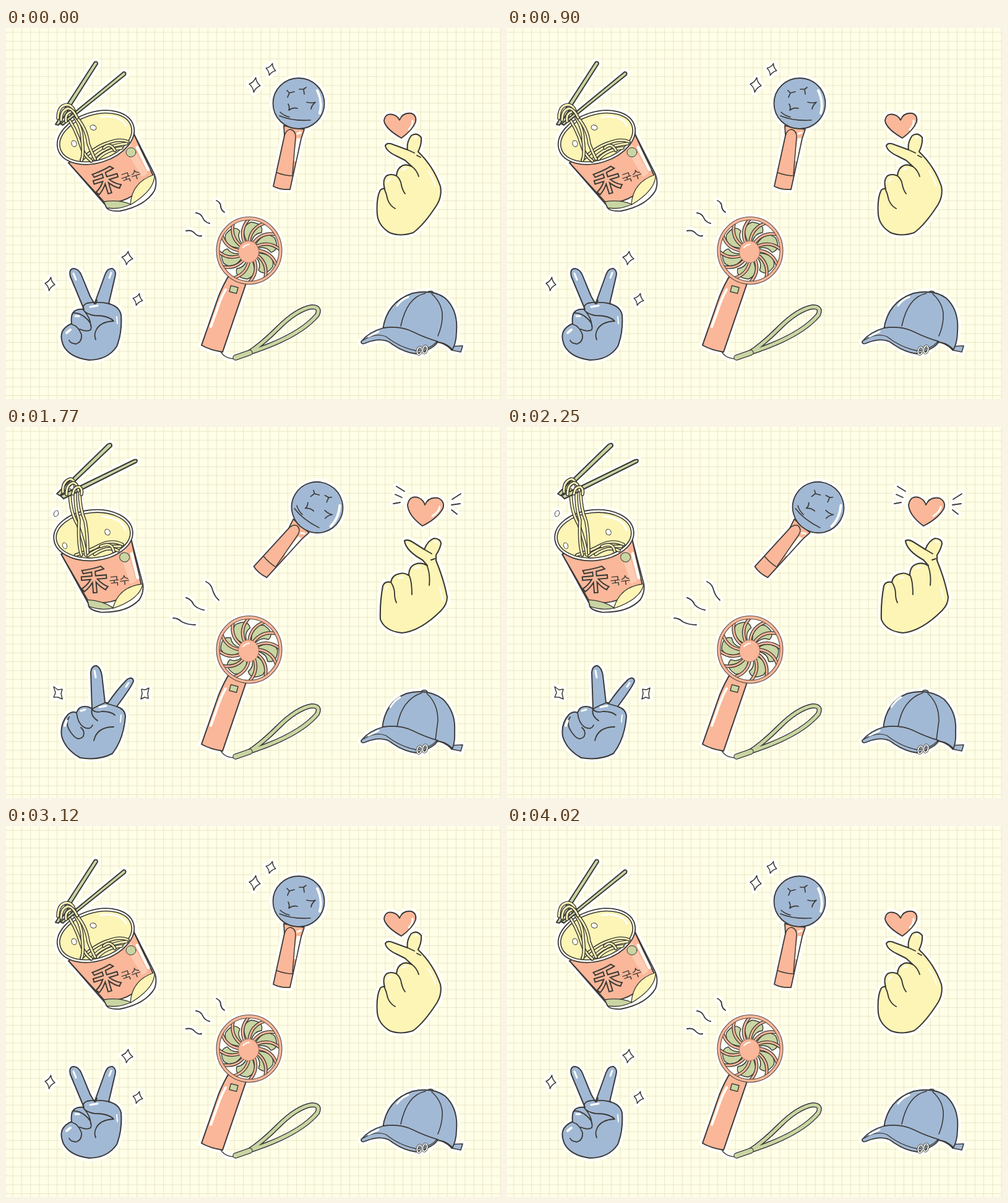
Animation, 800 px wide and 600 px high, one loop 4050 ms. Source, as an HTML page:

```html
<!DOCTYPE html>
<html lang="ko">
<head>
<meta charset="utf-8">
<title>Stickers</title>
<style>
html, body { margin: 0; width: 100%; height: 100%; overflow: hidden; background: #fffee6; }
svg { display: block; width: 800px; height: 600px; }
path, circle, ellipse { stroke-linecap: round; stroke-linejoin: round; }
text { font-family: "Noto Sans CJK KR", "Noto Sans CJK JP", "Noto Sans CJK", sans-serif; text-anchor: middle; }
.halo * { fill: #fffffa; stroke: #fffffa; stroke-width: 11; }
.halo [fill=none] { fill: none; }
</style>
</head>
<body>
<svg id="stage" viewBox="0 0 800 600"></svg>
<script>
const INK = '#3b3a36', CORAL = '#fbb799', BLUE = '#a2b9d5', YELLOW = '#fdf5b6',
      GREEN = '#c9d5a2', WHITE = '#fffffa';
const LOOP = 4050, HOLD = 450;

const path = (d, fill = 'none', w = 1.9, color = INK) =>
  `<path d="${d}" fill="${fill}" stroke="${color}" stroke-width="${w}"/>`;
const flat = (d, fill) => path(d, fill, 0, 'none');
const shine = (d, w = 3) => path(d, 'none', w, WHITE);
const oval = (x, y, rx, ry, turn, fill, w = 1.8, color = INK) =>
  `<ellipse rx="${rx}" ry="${ry}" transform="translate(${x} ${y}) rotate(${turn})" fill="${fill}" stroke="${color}" stroke-width="${w}"/>`;
const tube = (d, w, color, edge = 2.4) => path(d, 'none', w + edge, INK) + path(d, 'none', w, color);
const group = (move, body) => `<g transform="${move}">${body}</g>`;
const sticker = body => `<g class="halo">${body}</g>${body}`;
const spin = (count, body) =>
  Array.from({ length: count }, (_, i) => group(`rotate(${i * 360 / count})`, body)).join('');

function sparkle(x, y, w, h, turn = 8) {
  const a = w * .35, b = h * .35;
  return group(`translate(${x} ${y}) rotate(${turn})`, path(
    `M0 ${-h}Q${a * .6} ${-b} ${w} 0Q${a * .6} ${b} 0 ${h}Q${-a * .6} ${b} ${-w} 0Q${-a * .6} ${-b} 0 ${-h}Z`, WHITE, 1.5));
}

function grid() {
  let d = '';
  for (let v = 11; v < 800; v += 14.33) d += `M${v} 0V600M0 ${v - 4}H800`;
  return `<rect width="800" height="600" fill="#fffee6"/>` + path(d, 'none', 1, '#e9e6ca');
}

function cup() {
  return path('M101 218L161 287Q162 297 184 296Q225 288 240 263Q245 249 240 237L206 170Z', WHITE) +
    path('M101 218L160 283Q204 285 238 239L206 170Z', CORAL) +
    flat('M201 186L229 235L220 241L192 195Z', '#fdcbb2') +
    path('M212 193L230 229', 'none', 5, WHITE) +
    path('M158 281Q181 277 202 285Q184 294 163 291Z', GREEN, 1.3) +
    path('M201 286Q203 249 240 237Q241 262 201 286Z', YELLOW, 1.3) +
    oval(202, 201, 8, 7.5, 0, GREEN, 1) +
    oval(145, 177, 64, 41, -18, WHITE) +
    oval(145, 177, 60, 36.5, -18, YELLOW, 1.6) +
    shine('M153 144Q185 140 194 158', 3) +
    group('translate(162 248) rotate(-17)',
      `<text y="16" font-size="45" font-weight="900" fill="${CORAL}" stroke="${INK}" stroke-width="2">禾</text>`) +
    group('translate(202 240) rotate(-19)',
      `<text y="6" font-size="18" font-weight="500" fill="${INK}">국수</text>`);
}

const noodles = list => list.map(d => tube(d, 2.8, YELLOW, 2.8)).join('');
const stick = d => path(d, GREEN, 2);

function ramenA() {
  return sticker(cup() +
    oval(141, 161, 5, 4, 20, WHITE, 1) + oval(110, 187, 4, 5, -20, WHITE, 1) +
    noodles([
      'M122 213Q145 192 164 186Q184 178 197 184', 'M137 215Q158 190 195 187',
      'M148 212Q161 197 187 194', 'M158 194Q168 184 176 198',
      'M96 140Q112 160 121 190Q125 205 138 215', 'M105 136Q123 158 123 181Q126 204 122 214',
      'M109 139Q130 160 133 187Q139 203 144 212']) +
    stick('M143 55Q148 53 148 58L85 157L80 156L99 123Z') +
    stick('M190 71Q195 71 193 76L92 157L88 155Z') +
    noodles(['M84 146Q84 125 99 124Q108 125 111 137', 'M89 149Q89 132 101 130Q109 132 115 145', 'M97 151Q95 139 104 136']));
}

function ramenB() {
  return sticker(group('translate(-4 -2) rotate(12.3 145 177)', cup()) +
    oval(81, 140, 3.5, 5, 20, WHITE, 1) + oval(164, 170, 4, 5, -25, WHITE, 1) + oval(95, 192, 3.5, 5, -20, WHITE, 1) +
    noodles([
      'M113 207Q136 200 150 192Q170 181 188 190', 'M132 208Q154 191 185 193',
      'M143 206Q165 191 181 200', 'M153 193Q171 185 174 201',
      'M103 102Q103 137 116 158Q127 188 129 207', 'M112 101Q111 130 118 151Q116 190 122 207',
      'M119 103Q119 132 128 153Q132 175 132 204']) +
    stick('M164 28Q171 24 171 31L87 111L82 108Z') +
    stick('M207 53Q214 51 211 57L93 116L88 111Z') +
    noodles(['M92 105Q91 88 104 84Q111 85 112 97', 'M98 109Q97 93 109 90Q116 92 117 103', 'M108 108Q110 96 119 97Q124 101 122 109']));
}

// Drawn around the centre of the ball; turn is the lean from the upright pose.
function lightStick(x, y, turn) {
  return sticker(group(`translate(${x} ${y}) rotate(${turn})`,
    path('M-24 36L-23 52L-41 134Q-30 140 -14 139L4 57L9 42Z', CORAL, 1.8) +
    flat('M-3 56L3 56L-5 94L-9 92Z', WHITE) + shine('M-2 49L3 47', 3) +
    path('M-23 52Q-20 42 -13 42Q-5 44 -5 54L-10 115M-35 112Q-22 117 -9 117', 'none', 1.5) +
    oval(0, 0, 41.5, 41, 0, BLUE, 1.8) +
    shine('M30 -21Q39 -2 34 16', 4) +
    path('M-31 20Q-10 29 19 27M-30 14Q-24 20 -15 22', 'none', 1.6) +
    path('M-19 -21L-15 -17L-7 -19M-15 -17L-18 -10M1 -23L8 -23L12 -26M8 -23L9 -15M13 -2Q21 0 27 -2Q21 3 20 9M-17 1Q-14 6 -16 11Q-9 6 -2 8', 'none', 1.7)));
}

function heartHandA() {
  return sticker(
    path('M613 190Q616 184 627 189L649 197Q647 185 655 174Q664 168 671 177Q672 188 666 200Q691 224 702 256Q705 271 697 285Q676 318 658 331Q637 338 620 331Q602 320 600 302Q598 275 605 262Q609 259 612 260Q608 246 615 239Q622 235 631 239Q632 226 642 222Q649 220 656 224L645 214L631 207Q614 199 613 190Z', YELLOW, 2.1) +
    path('M611 259Q615 268 617 278Q621 288 629 292M631 239Q638 245 639 254Q641 263 645 268M656 224Q664 230 667 240M649 197L660 202M664 206L670 209', 'none', 1.9) +
    shine('M617 248L621 244', 3) + shine('M641 229L646 227', 3) + shine('M661 177L664 176', 3) + shine('M682 231Q691 244 694 256', 2) +
    path('M639 178Q613 163 611 150Q613 137 625 140Q633 142 636 149Q641 136 655 138Q664 141 662 152Q657 165 639 178Z', CORAL) +
    shine('M651 164Q658 157 657 150', 3));
}

function heartHandB() {
  return sticker(
    path('M644 184Q649 181 657 186L676 198Q682 183 692 180Q703 181 703 189Q701 198 695 207L695 216Q708 248 713 275Q713 287 703 297Q670 330 640 333Q612 330 605 311Q604 285 609 257Q612 249 622 251Q624 239 637 237Q643 235 651 240Q651 224 664 221Q672 219 681 224L673 215Q646 200 644 184Z', YELLOW, 2.1) +
    path('M622 251Q628 260 628 270Q628 278 631 284M651 239Q656 248 656 271M680 223Q686 238 684 256M676 198L688 205M687 215L693 213', 'none', 1.9) +
    shine('M614 262L616 258', 3) + shine('M635 244L641 243', 3) + shine('M661 228L667 227', 3) + shine('M693 186L697 186', 3) + shine('M701 260L706 280', 2) +
    path('M673 160Q650 143 649 126Q652 110 666 114Q675 118 677 126Q683 112 699 115Q710 121 706 132Q697 148 673 160Z', CORAL) +
    shine('M689 144Q700 137 701 129', 3) +
    path('M631 96L644 104M629 109L640 114M626 124L637 122M721 117L735 108M720 126L734 124M720 134L729 141', 'none', 1.8));
}

function peaceA() {
  return sticker(
    path('M126 455L104 402Q101 389 110 389Q118 390 122 400L136 434L143 446L160 399Q164 388 172 389Q179 393 176 403L166 446Q183 450 186 464Q188 492 179 515Q164 537 134 537Q103 533 93 514Q87 500 91 491Q95 483 106 478Q104 461 112 457Q117 454 126 455Z', BLUE, 2) +
    path('M125 456Q123 448 131 445Q148 442 168 446M125 456Q130 463 143 465Q166 465 174 474Q151 475 145 490Q142 497 145 504M108 461Q119 460 129 469Q140 478 137 488Q130 492 119 487M106 479Q117 482 122 496Q123 508 113 511Q104 510 102 505M125 456Q137 469 137 482M145 446L147 440', 'none', 1.8) +
    shine('M109 397L113 407', 3) + shine('M170 396L167 404', 3) + shine('M136 451L148 449', 3) + shine('M98 493L104 488', 4) + shine('M112 466L118 466', 3) + shine('M179 467L180 478', 2) +
    sparkle(71, 414, 8, 11) + sparkle(196, 372, 9, 11) + sparkle(213, 439, 8, 10, 15));
}

function peaceB() {
  return sticker(
    path('M139 456L137 397Q138 386 146 386Q153 389 155 402L160 446H165Q180 424 196 408Q205 403 206 411Q203 420 179 452Q192 456 193 468Q190 505 172 528Q150 540 120 535Q96 522 90 500Q87 480 100 465Q107 459 114 462Q118 451 128 452Q134 452 139 456Z', BLUE, 2) +
    path('M139 456Q143 463 155 460Q170 460 176 466M142 507Q147 485 174 485M102 469Q94 482 108 498Q117 509 125 500Q128 492 121 486M114 462Q116 479 125 485Q136 491 140 482M139 456Q136 467 148 475M160 446Q150 450 139 456M162 447L179 452', 'none', 1.8) +
    shine('M143 394L145 405', 3) + shine('M198 414L194 420', 3) + shine('M98 475L95 483', 4) + shine('M121 459L128 457', 3) + shine('M151 453L162 451', 3) + shine('M186 466L185 477', 2) +
    path('M77 420L84 425L91 424L89 431L91 440L84 437L77 437L80 430Z', WHITE, 1.5) +
    path('M219 424L225 425L231 422L229 431L230 439L224 437L218 440L220 431Z', WHITE, 1.5));
}

function fan(turn) {
  const strap = 'M371 533L393 525Q474 499 503 464Q509 451 494 451Q470 455 440 485Q415 510 393 525';
  const blade = path('M-4 -15Q-16 -39 3 -46Q24 -44 20 -29Q8 -28 4 -15Z', GREEN, 1.4);
  const rib = tube('M0 -15Q3 -37 24 -44', 2.8, CORAL, 2.6);
  return sticker(
    path('M347 523Q352 534 369 535', 'none', 1.6) +
    tube(strap, 5.2, GREEN, 3) + tube('M371 533L394 525', 7, GREEN) +
    path('M359 402Q346 425 340 444L316 513Q330 521 350 524L388 413Z', CORAL, 2) +
    shine('M355 423Q349 433 345 444L331 483', 4) +
    group('translate(368 423) rotate(15)', path('M-6 -5H6V5H-6Z', GREEN, 1.4)) +
    group('translate(393 360)',
      oval(0, 0, 52, 53, 0, WHITE, 1) +
      group(`rotate(${turn})`, spin(6, blade)) + spin(12, rib) +
      oval(0, 0, 50.5, 52, 0, 'none', 6, '#5b4a41') + oval(0, 0, 50.5, 52, 0, 'none', 3.8, CORAL) +
      oval(-1, 2, 16.5, 17.5, 0, CORAL, .8, '#a8705c') + shine('M-10 -5Q-5 -10 0 -10', 2)));
}

const wind = d => sticker(path(d, 'none', 1.9));

function cap(crown, seams, knob) {
  return sticker(
    path('M716 515L738 514L735 524L720 521Z', BLUE, 1.6) +
    oval(knob, 429, 5, 3.5, 0, BLUE, 1.6) +
    path(crown, BLUE, 1.9) + path(seams, 'none', 1.6) +
    path('M574 507Q587 491 610 485Q636 481 657 491Q677 501 698 507Q692 519 663 527Q644 525 625 512Q609 498 580 510Q574 512 574 507Z', BLUE, 1.8) +
    path('M577 505Q598 492 614 499Q637 517 663 522Q687 519 696 507M697 508Q710 508 722 520', 'none', 1.3) +
    shine('M586 499L602 491', 3) +
    oval(668, 522, 3.5, 6, 15, 'none', 3.6) + oval(668, 522, 3.5, 6, 15, 'none', 1.8, WHITE) +
    oval(677, 520, 3.5, 6, 15, 'none', 3.6) + oval(677, 520, 3.5, 6, 15, 'none', 1.8, WHITE));
}

const capA = cap('M609 488Q615 443 657 429Q690 422 710 437Q731 457 728 491Q728 509 721 521Q708 508 695 508Z',
  'M688 430Q707 447 705 470Q704 484 698 498M678 429Q648 435 638 482', 686) +
  shine('M632 449Q639 439 650 435', 3);
const capB = cap('M608 488Q612 445 647 431Q681 422 706 440Q727 461 725 491Q726 511 721 521Q708 508 695 508Z',
  'M680 431Q698 447 698 475L694 506M672 430Q639 441 632 485', 676) +
  shine('M621 453Q628 442 637 437', 3);

const poseA = ramenA() + lightStick(473, 122, 0) +
  sticker(sparkle(402, 92, 9, 12) + sparkle(428, 67, 8, 10, 15)) +
  heartHandA() + peaceA() + fan(0) + capA +
  wind('M291 328Q299 326 304 331Q310 338 316 336M307 299Q315 300 318 307Q321 314 329 316M340 279Q347 282 347 289Q348 295 353 298');
const poseB = ramenB() + lightStick(503, 130, 30) +
  heartHandB() + peaceB() + fan(28) + capB +
  wind('M270 309Q278 309 284 315Q294 320 306 320M291 276Q300 279 303 287Q309 294 320 296M323 250Q332 254 334 264Q337 274 344 280');

document.getElementById('stage').innerHTML = grid() + `<g id="a">${poseA}</g><g id="b">${poseB}</g>`;
const a = document.getElementById('a'), b = document.getElementById('b');

function draw() {
  const second = Math.floor(performance.now() % LOOP / HOLD) % 2 === 1;
  a.style.display = second ? 'none' : '';
  b.style.display = second ? '' : 'none';
  requestAnimationFrame(draw);
}
draw();
</script>
</body>
</html>
```
